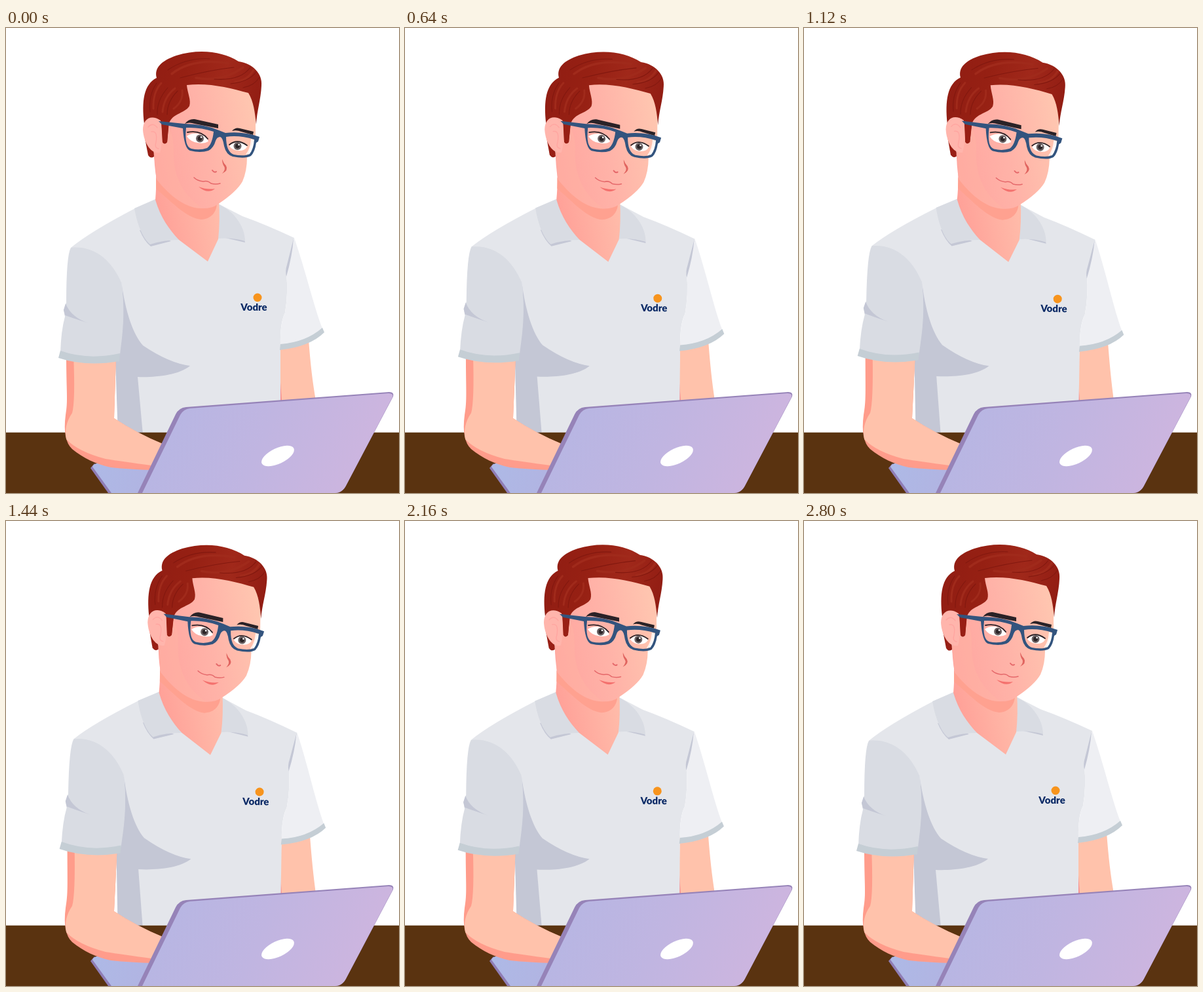
These frames come from a looping animation (600x709 px, 2880 ms). An HTML page with a canvas:

```html
<!DOCTYPE html>
<html lang="en">
<head>
<meta charset="utf-8">
<title>Typing at a laptop</title>
<style>
html, body { margin: 0; width: 100%; height: 100%; overflow: hidden; background: #fff; }
canvas { display: block; }
</style>
</head>
<body>
<canvas id="stage" width="600" height="709"></canvas>
<script>
const ctx = document.getElementById('stage').getContext('2d');
const LOOP = 2880, STEP = 80, PEAK = 1200, MAX_LEAN = 0.0172;
const PIVOT = [260, 600];
const SHIRT = '#e4e6eb', SLEEVE = '#d9dce3', FOLD = '#c4c7d5', CUFF = '#c5ced5';
const SKIN = '#ffc2ab', SKIN_SHADE = '#ff9c8b', FRAME = '#33547e', INK = '#2a2227';

function fill(color, d, rule = 'nonzero') {
  ctx.fillStyle = color;
  ctx.fill(new Path2D(d), rule);
}

function line(color, width, d) {
  ctx.strokeStyle = color;
  ctx.lineWidth = width;
  ctx.stroke(new Path2D(d));
}

function oval(color, x, y, rx, ry = rx, turn = 0) {
  ctx.fillStyle = color;
  ctx.beginPath();
  ctx.ellipse(x, y, rx, ry, turn, 0, 7);
  ctx.fill();
}

function blend(x0, y0, x1, y1, ...colors) {
  const g = ctx.createLinearGradient(x0, y0, x1, y1);
  colors.forEach((c, i) => g.addColorStop(i / (colors.length - 1), c));
  return g;
}

function leaning(angle, draw) {
  ctx.save();
  ctx.translate(...PIVOT);
  ctx.rotate(angle);
  ctx.translate(-PIVOT[0], -PIVOT[1]);
  draw();
  ctx.restore();
}

function drawTorso() {
  fill(SHIRT, `M228 262L197 275Q128 311 99 335L130 420 168 508 171 617H419V484
    Q418 450 426 434Q431 405 428 373L440 320Q395 299 361 287L324 268Z`);
  fill(FOLD, `M176 386C182 432 194 467 209 484Q249 511 281 515C263 530 226 533 201 532
    L209 620H171L167 508 174 490C180 455 180 415 176 386Z`);
  fill('#eeeff3', `M440 320C458 372 470 425 483 458Q458 481 419 484Q418 452 426 434
    Q431 405 428 373Z`);
  fill(FOLD, 'M439 321Q437 348 428 379Q426 370 429 361Z');
  fill(CUFF, 'M483 457L486 464Q464 486 418 491L419 482Q458 479 483 457Z');

  fill(FOLD, 'M204 308Q211 325 221 333L252 325 235 318Z');
  fill(SLEEVE, 'M228 261L196 275C200 298 208 320 220 330Q241 323 265 323L240 290Z');
  fill(FOLD, 'M335 320L365 327 363 319Z');
  fill(SLEEVE, 'M323 268C347 278 365 302 365 325Q345 319 324 321Z');
}

function drawBadge() {
  oval('#f7941d', 384, 411, 6.5);
  ctx.fillStyle = '#0b2a66';
  ctx.font = '900 15px Lato, sans-serif';
  ctx.textAlign = 'center';
  ctx.fillText('Vodre', 378.5, 431);
}

function drawSleeve() {
  fill(SLEEVE, `M99 335C136 331 162 356 176 388C182 430 179 460 174 498Q124 508 83 495
    Q84 462 90 440L88 430 92 419Q92 347 99 335Z`);
  fill(FOLD, 'M91 420L88 430 90 438Q104 443 126 450Q99 441 91 420Z');
  fill(CUFF, 'M83 492L80 503Q122 517 173 508L174 496Q125 507 83 492Z');
}

function drawNeckAndFace() {
  fill(blend(230, 300, 326, 280, '#ff9f97', '#ffbcaa'),
    'M225 190C230 215 230 240 228 262C236 289 249 307 264 323L308 356 324 322Q327 295 325 262Z');
  fill('#ffa190', 'M229 228Q245 258 322 266C322 280 314 291 298 292C275 290 252 264 229 245Z');
  fill(blend(225, 180, 382, 150, '#ffa6a0', '#ffb3a8', '#ffc6b0'),
    `M226 185Q226 210 230 231C252 258 276 276 301 275Q315 275 323 269
    Q352 250 361 234Q368 218 368 197L381 164V130L372 92 277 82 240 120Z`);
  fill('rgba(255,180,164,.4)',
    'M240 140Q256 155 256 185C255 218 264 250 300 275C270 275 246 251 230 231L226 185Z');
}

function drawHair() {
  fill('#981f15', 'M212 168L217 194Q221 200 226 196L225 180Z');
  fill(blend(215, 60, 390, 100, '#911d13', '#962013', '#a0281a', '#921d13'),
    `M211 146C207 112 210 86 230 76C226 61 237 50 260 42C296 31 331 36 355 51
    C377 54 392 70 390 88C389 110 383 126 382 147C380 128 378 112 370 99
    C341 91 308 83 276 87C277 99 283 110 280 119C273 131 250 130 248 150
    L246 174Q242 179 239 174L237 144C231 135 219 135 211 146Z`);
  const streak = '#a02a1b', groove = '#82180f';
  line(streak, 3.5, 'M253 70Q285 45 340 54M290 76Q330 83 362 60M350 82Q369 80 378 64');
  line(streak, 3, 'M225 123Q224 98 237 84M239 128Q241 105 258 92M256 123Q271 112 269 95');
  line(groove, 1.1, `M247 64Q275 45 311 47M266 76Q311 64 348 60M318 78Q358 81 373 60
    M343 85Q371 82 382 67M362 91Q379 88 387 75M220 128Q217 103 230 84
    M231 132Q230 110 247 91M246 132Q246 112 262 96`);
  fill('#ffb5ac', `M236 141C221 131 209 139 209 155C210 174 221 193 235 190
    Q240 174 236 141Z`);
  line('#ffa5a0', 1.3, 'M217 151Q224 143 231 152M222 158Q232 156 229 174Q226 183 233 184');
  fill('#981f15', 'M238 143L249 143 246 174Q242 178 239 174Z');
}

function drawEye(x, y, white, lid) {
  fill('#fff', white);
  ctx.save();
  ctx.clip(new Path2D(white));
  oval('#6b6264', x, y, 6);
  oval('#2b2528', x, y, 3.4);
  ctx.restore();
  oval('#fff', x + 2, y - 2, 1.3);
  line(INK, 1.8, lid);
}

function drawFeatures() {
  fill(INK, 'M273 146Q279 138 288 139L324 147V153L288 146Q280 143 273 146Z');
  fill(INK, 'M345 157Q350 151 357 153L378 158 377 163 359 158Q352 155 345 157Z');
  drawEye(296, 168.5, 'M276 165Q283 160 293 161Q305 163 309 173Q302 177 293 175Q282 174 276 165Z',
    'M277 159Q297 155 308 169');
  drawEye(353.5, 180, 'M341 180Q347 173 356 174Q364 175 368 181Q365 187 356 187Q346 187 341 180Z',
    'M341 178Q353 168 368 179');
  fill('rgba(255,255,255,.8)', 'M379 171Q377 187 368 193L366 193Q373 184 374 169Z');
  fill(FRAME, `M233 142L272 146Q301 146 325 156L335 160Q362 157 387 166L385 173 382 175
    Q380 189 374 195Q365 200 346 196Q336 193 333 180Q331 167 327 166Q322 166 320 172
    Q317 183 309 187Q297 191 281 187Q272 184 270 153L238 147Z
    M275 152Q272 181 283 184Q296 187 307 183Q315 177 317 158Q297 151 275 152Z
    M336 166Q336 189 348 193Q364 196 372 192Q378 184 379 170Q356 163 336 166Z`, 'evenodd');

  fill('#e0645f', 'M330 200Q332 206 336 210Q340 217 330 222Q336 215 333 211Q330 207 330 200Z');
  line('#e5686a', 2, 'M315 217Q318 221 321 219');
  line('#e5686a', 1.5, 'M287 228Q292 233 301 234Q308 232 313 237Q320 239 327 237');
  fill('#f4716e', 'M294 242Q307 247 319 245Q308 254 294 242Z');
}

function drawDesk() {
  ctx.fillStyle = '#5a3310';
  ctx.fillRect(0, 616.7, 600, 93);
  fill('#8f7db5', 'M129 671L135 664 165 709H156Z');
  fill(blend(135, 670, 215, 700, '#aeb9e6', '#b1b4e2'),
    'M132 669Q133 664 143 663L225 672 204 709H161Z');
}

function drawNearArm(dx) {
  const a = x => x + dx;
  const inner = `${a(168)} 500L165 595Q200 618 239 634L224 674`;
  fill(SKIN_SHADE, `M${a(92)} 498C${a(92)} 555 95 568 91 590Q86 628 101 642
    C118 656 138 665 160 670Q190 673 224 674L239 634Q200 618 165 595L${a(168)} 500Z`);
  fill(SKIN, `M${a(103)} 498L${inner} 222 667Q178 661 152 657Q110 646 92 627
    Q88 606 101 587Q106 569 ${a(103)} 498Z`);
}

function drawFarArm(dx) {
  const a = x => x + dx;
  fill(SKIN, `M${a(419)} 480L${a(462)} 475Q${a(466)} 530 473 568L418 575Z`);
  fill('#f58f92', 'M419 540L421 568 418 572Z');
}

function drawLid() {
  fill('#9683b8', `M275 578L585 555Q593 555 591 562L520 696Q514 709 502 709H201
    L259 589Q264 579 275 578Z`);
  fill(blend(245, 590, 520, 709, '#b7b6e3', '#c0b5e1', '#ccb5df'),
    `M281 580L584 557Q592 557 590 563L520 696Q514 709 502 709H208
    L266 590Q271 581 281 580Z`);
  oval('#fff', 415, 652.5, 27, 11.8, -0.44);
}

function leanAt(ms) {
  const u = ms < PEAK ? ms / PEAK : 1 - (ms - PEAK) / (LOOP - PEAK);
  return MAX_LEAN * (1 - Math.cos(Math.PI * u)) / 2;
}

function render(now) {
  const angle = leanAt(Math.floor((now % LOOP) / STEP) * STEP);
  const armShift = angle * 100;
  ctx.lineCap = ctx.lineJoin = 'round';
  ctx.fillStyle = '#fff';
  ctx.fillRect(0, 0, 600, 709);
  drawFarArm(armShift);
  leaning(angle, () => {
    drawTorso();
    drawBadge();
    drawNeckAndFace();
    drawHair();
    drawFeatures();
  });
  drawDesk();
  drawNearArm(armShift);
  leaning(angle, drawSleeve);
  drawLid();
}

const start = performance.now();
function tick() {
  render(performance.now() - start);
  requestAnimationFrame(tick);
}
tick();
</script>
</body>
</html>
```
